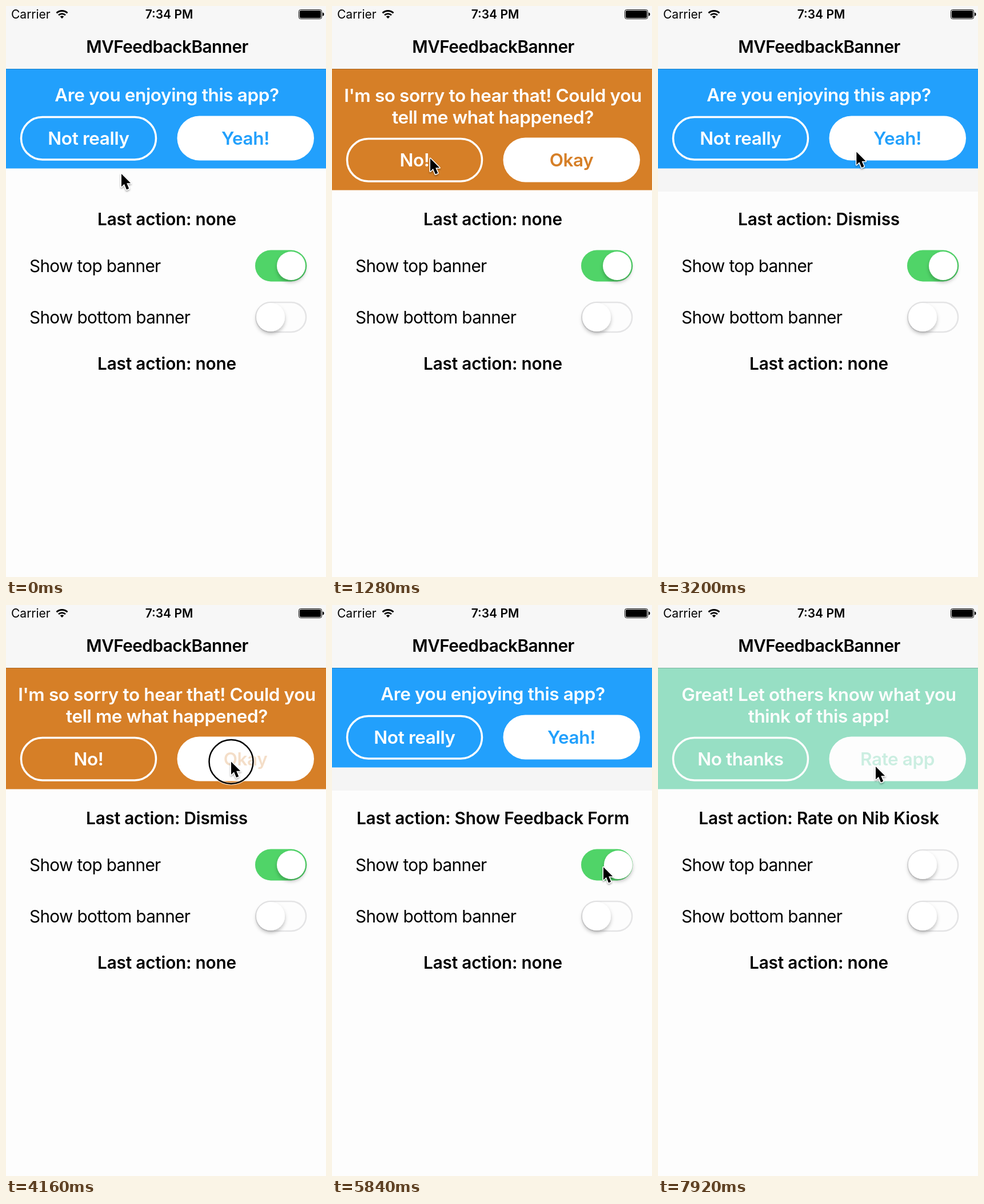
An HTML page that plays this animation: 560x1000 px, repeating every 8000 ms.

```html
<!DOCTYPE html>
<html lang="en">
<head>
<meta charset="utf-8">
<title>Feedback banner</title>
<style>
  html, body { margin: 0; width: 100%; height: 100%; overflow: hidden; background: #fdfdfd; }
  svg { display: block; width: 100%; height: 100%; }
  text { font: 29.75px Inter, "Open Sans", sans-serif; letter-spacing: -.022em; }
  .bold { font-weight: 600; letter-spacing: -.007em; }
  .title { letter-spacing: -.018em; }
  .mid { text-anchor: middle; }
  .banner text { font-size: 31.5px; font-weight: 600; letter-spacing: -.0125em; text-anchor: middle; fill: #fff; }
  .status { font-size: 21px; letter-spacing: 0; }
</style>
</head>
<body>
<svg viewBox="0 0 560 1000">
  <defs>
    <filter id="knobShadow" x="-50%" y="-50%" width="200%" height="200%">
      <feDropShadow dx="0" dy="4" stdDeviation="3" flood-opacity=".25"/>
    </filter>
    <filter id="arrowShadow" x="-50%" y="-50%" width="200%" height="200%">
      <feDropShadow dx="0" dy="2" stdDeviation="1.5" flood-opacity=".35"/>
    </filter>
  </defs>
  <rect width="560" height="1000" fill="#fdfdfd"/>
  <rect id="strip" y="285" width="560" height="40" fill="#f5f5f5"/>
  <g id="banners"></g>

  <rect width="560" height="110" fill="#f7f7f7"/>
  <rect y="110" width="560" height="1" fill="#000" fill-opacity=".2"/>
  <text class="status" x="9" y="22">Carrier</text>
  <text class="status bold mid" x="285.5" y="22">7:34 PM</text>
  <g fill="none" stroke="#000" stroke-width="2.8">
    <path d="M88.5 12.2a14 14 0 0 1 19 0M92 16a9 9 0 0 1 12 0"/>
    <path d="M98 22l-3.3-3.4a5 5 0 0 1 6.6 0z" fill="#000" stroke="none"/>
  </g>
  <rect x="512.5" y="6.5" width="40" height="16" rx="3" fill="none" stroke="#000"/>
  <rect x="514" y="8" width="37" height="13" rx="1.8"/>
  <path d="M554 11.5q2.5 0 2.5 3t-2.5 3z"/>
  <text class="bold title mid" x="282" y="81.5">MVFeedbackBanner</text>

  <text id="action" class="bold mid" x="281.5" y="384"></text>
  <text x="41" y="465.5">Show top banner</text>
  <text x="41" y="556">Show bottom banner</text>
  <text class="bold mid" x="281.5" y="636.5">Last action: none</text>
  <g id="switches"></g>

  <g id="ring" fill="none">
    <circle r="38.5" stroke="#fff" stroke-opacity=".6" stroke-width="5"/>
    <circle r="38.5" stroke="#000" stroke-width="2.5"/>
  </g>
  <path id="arrow" d="M0 0V22.5L5 17.8L9 27.5L13.2 25.7L9.2 16.3H16.2Z" stroke="#fff"
        stroke-width="3" stroke-linejoin="round" paint-order="stroke" filter="url(#arrowShadow)"/>
</svg>
<script>
const LOOP = 8000, FADE = 200, PRESS = 140;
const $ = id => document.getElementById(id);
const clamp = v => Math.max(0, Math.min(1, v));
const mix = (a, b, p) => a + (b - a) * p;

const kinds = {
  blue: ['#22a0fc', ['Are you enjoying this app?'], 'Not really', 'Yeah!'],
  orange: ['#d67f27', ["I'm so sorry to hear that! Could you", 'tell me what happened?'], 'No!', 'Okay'],
  green: ['#26be85', ['Great! Let others know what you', 'think of this app!'], 'No thanks', 'Rate app']
};

// time, banner now shown, what was pressed, new action label
const steps = [
  [-999, 'blue', ''],
  [640, 'orange', 'left'],
  [1520, null, 'left', 'Dismiss'],
  [2480, 'blue', 'switch'],
  [3660, 'orange', 'left'],
  [4200, null, 'right', 'Show Feedback Form'],
  [5560, 'blue', 'switch'],
  [6680, 'green', 'right'],
  [7815, null, 'right', 'Rate on Nib Kiosk']
];

// start, end, control x, y, end x, y
const moves = [
  [80, 480, 180, 270, 150, 238],
  [800, 1240, 155, 255, 172, 267],
  [1720, 2320, 320, 370, 470, 462],
  [2800, 3520, 443, 193, 150, 240],
  [3700, 4040, 280, 250, 394, 274.5],
  [4440, 5200, 270, 620, 463, 465],
  [5280, 5380, 470, 460, 475, 459],
  [5920, 6480, 440, 330, 388, 246],
  [6740, 7000, 380, 262, 384, 285],
  [7100, 7500, 383, 284, 381, 283]
];

function bannerMarkup(name) {
  const [color, lines, left, right] = kinds[name];
  const extra = (lines.length - 1) * 38;
  const top = 193 + extra, base = 243 + extra;
  const label = lines.map((s, i) =>
    `<text x="281.5" y="${167 + (extra ? 1 : 0) + i * 37.5}">${s}</text>`).join('');
  return `<g class="banner" id="${name}">
    <rect y="110" width="560" height="${174.5 + extra}" fill="${color}"/>${label}
    <rect x="26.5" y="${top + 1.5}" width="236" height="74.5" rx="37.2" fill="none" stroke="#fff" stroke-width="3.5"/>
    <rect x="299.5" y="${top - .5}" width="239.5" height="78" rx="39" fill="#fff"/>
    <text class="left" x="144.5" y="${base}">${left}</text>
    <text class="right" x="419" y="${base}" style="fill:${color}">${right}</text></g>`;
}

const switchMarkup = (id, y) => `<g id="${id}">
  <rect x="437.3" y="${y - 26}" width="87.8" height="52" rx="26" fill="#fdfdfd" stroke="#e4e4e5" stroke-width="2.6"/>
  <rect class="on" x="436" y="${y - 27.4}" width="90.3" height="54.8" rx="27.4" fill="#50d468" opacity="0"/>
  <circle class="knob" cx="463" cy="${y}" r="25" fill="#fff" filter="url(#knobShadow)"/></g>`;

$('banners').innerHTML = Object.keys(kinds).map(bannerMarkup).join('');
$('switches').innerHTML = switchMarkup('topSwitch', 455) + switchMarkup('bottomSwitch', 545);
const knob = document.querySelector('#topSwitch .knob');
const track = document.querySelector('#topSwitch .on');

function cursorAt(t) {
  let x = 202, y = 294;
  for (const [from, to, cx, cy, ex, ey] of moves) {
    if (t < from) break;
    const u = clamp((t - from) / (to - from)), p = u * u * (3 - 2 * u);
    x = mix(mix(x, cx, p), mix(cx, ex, p), p);
    y = mix(mix(y, cy, p), mix(cy, ey, p), p);
  }
  return [x, y];
}

const easeBack = u => 1 + 2.70158 * (u - 1) ** 3 + 1.70158 * (u - 1) ** 2;

// Pressed labels dim at once, then recover after release
function labelOpacity(t, name, side) {
  let opacity = 1;
  steps.forEach(([at, , pressed], i) => {
    if (pressed !== side || steps[i - 1][1] !== name || t < at - PRESS) return;
    opacity = mix(.25, 1, clamp((t - at) / 330));
  });
  return opacity;
}

function draw(t) {
  const i = steps.findLastIndex(s => s[0] <= t);
  const [at, shown, pressed] = steps[i];
  const before = i ? steps[i - 1][1] : null;
  const p = clamp((t - at) / FADE);

  for (const name in kinds) {
    const group = $(name);
    let opacity = 0;
    if (name === shown) opacity = p;
    else if (name === before && p < 1) opacity = shown ? 1 : 1 - p;
    group.setAttribute('opacity', opacity);
    for (const side of ['left', 'right'])
      group.querySelector('.' + side).setAttribute('opacity', labelOpacity(t, name, side));
  }
  $('strip').setAttribute('opacity', shown === 'blue' && i ? p : 0);

  const last = steps.slice(0, i + 1).reverse().find(s => s[3]);
  $('action').textContent = 'Last action: ' + (last ? last[3] : 'none');

  const slide = pressed === 'switch' ? clamp((t - at) / 360) : 1;
  knob.setAttribute('cx', shown ? mix(463, 499, easeBack(slide)) : 463);
  track.setAttribute('opacity', shown ? clamp(slide * 2) : 0);

  const place = `translate(${cursorAt(t)})`;
  const down = steps.some(s => t >= s[0] - PRESS && t < s[0]);
  $('arrow').setAttribute('transform', place);
  $('ring').setAttribute('transform', place);
  $('ring').setAttribute('visibility', down ? 'visible' : 'hidden');
}

const start = performance.now();
function tick() {
  draw((performance.now() - start) % LOOP);
  requestAnimationFrame(tick);
}
tick();
</script>
</body>
</html>
```
